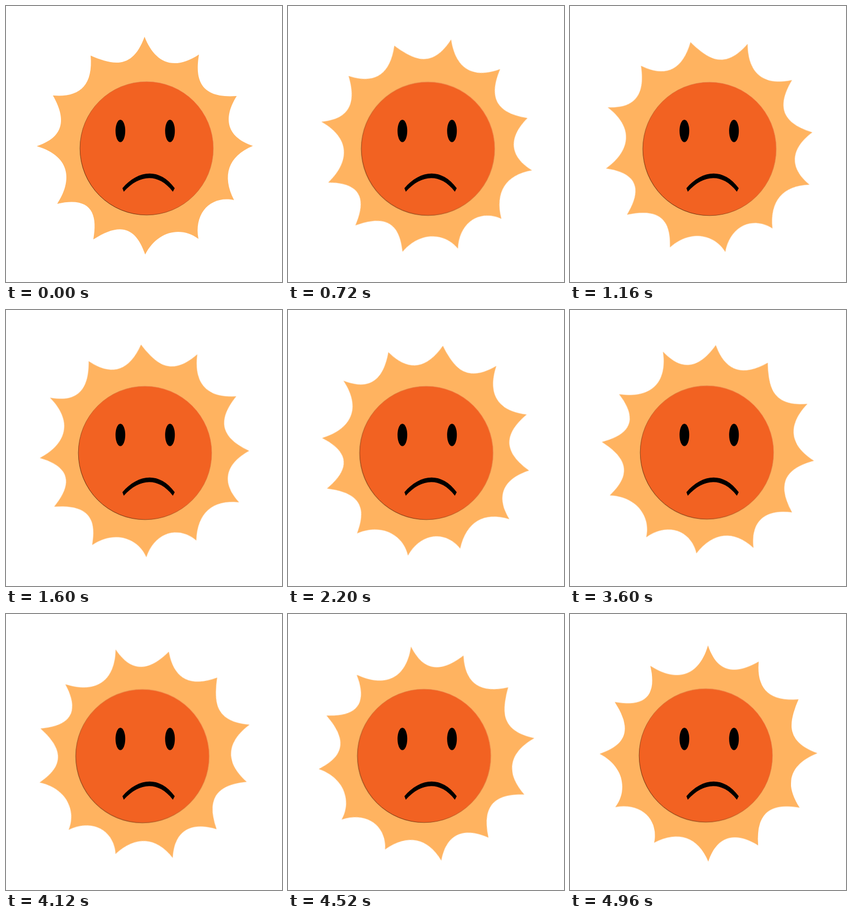
An HTML page that plays this animation: 512x512 px, repeating every 5 s.

```html
<!DOCTYPE html>
<html lang="en">
<head>
<meta charset="utf-8">
<title>Sad sun</title>
<style>
  html, body { margin: 0; width: 100%; height: 100%; overflow: hidden; background: #fff; }
  svg { display: block; width: 100vw; height: 100vh; }

  /* 125 held poses covering a quarter turn, both ends included */
  .sun, .disc { animation: 5s steps(125, jump-none) infinite; }
  .sun { transform-origin: 257.35px 258.65px; animation-name: turn; }

  /* turns back on itself so the rim shading keeps its direction */
  .disc { transform-origin: 261px 264px; animation-name: unturn; }

  @keyframes turn { from { transform: rotate(0deg); } to { transform: rotate(90deg); } }
  @keyframes unturn { from { transform: rotate(0deg); } to { transform: rotate(-90deg); } }
</style>
</head>
<body>
<svg viewBox="0 0 512 512">
  <defs>
    <linearGradient id="rim" x1="0.15" y1="0.85" x2="0.85" y2="0.15">
      <stop offset="0" stop-color="#3a1804" stop-opacity=".8"/>
      <stop offset=".5" stop-color="#b8602a" stop-opacity=".6"/>
      <stop offset="1" stop-color="#f0a070" stop-opacity=".6"/>
    </linearGradient>
  </defs>
  <g class="sun">
    <path fill="#ffb360" d="M257 57
      C274 100 306 124 358 90
      C350 137 361 172 428 167
      C404 205 406 242 458 259.4
      C412 279 400 314 423 360
      C381 351 348 383 357 432
      C325 408 281 417 258.2 461
      C241 411 213 400 162 433
      C171 384 157 353 95 367
      C121 328 124 280 57 260
      C100 246 117 218 87 166
      C134 170 162 150 157 92
      C199 110 235 118 257 57Z"/>
    <circle class="disc" cx="261" cy="264" r="123.8" fill="#f26222" stroke="url(#rim)"/>
  </g>
  <g class="face">
    <ellipse cx="212.2" cy="231.7" rx="9" ry="20.8"/>
    <ellipse cx="304.2" cy="231.7" rx="9" ry="20.8"/>
    <path d="M216 338C244 305 284 298.5 313 338L309.5 344.5C282 309 247 313 218.5 344.5Z"/>
  </g>
</svg>
</body>
</html>
```
